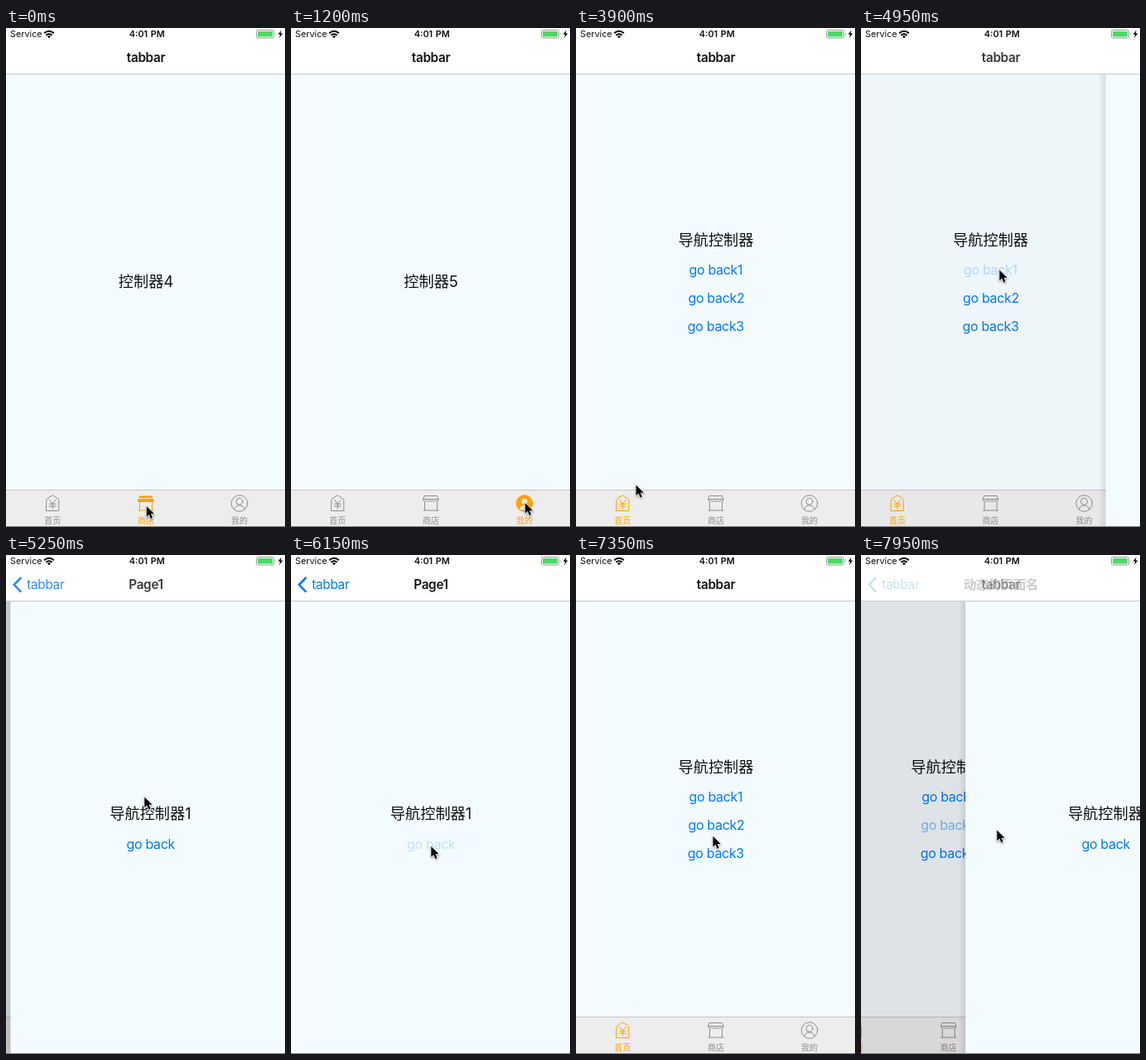
An HTML page that plays this animation: 337x601 px, repeating every 8 s.

```html
<!DOCTYPE html>
<html lang="zh-CN">
<head>
<meta charset="utf-8">
<title>tabbar</title>
<style>
  html, body { margin: 0; width: 100%; height: 100%; overflow: hidden; background: #fff; }
  svg { display: block; width: 100%; height: 100%; }
  text { font-family: Inter, "Noto Sans CJK SC", "Noto Sans CJK", sans-serif; fill: #111; }
  .mid { text-anchor: middle; }
  .status { font-size: 10.8px; }
  .title { font-size: 15.3px; font-weight: 600; letter-spacing: -.02em; }
  .heading { font-size: 18.2px; }
  .button { font-size: 16px; letter-spacing: -.02em; fill: #007aff; }
  .back { font-size: 15.3px; letter-spacing: -.02em; fill: #007aff; }
  .tab { color: #8e8e8e; fill: none; stroke: currentColor; stroke-linejoin: round; stroke-linecap: round; }
  .tab text { font-size: 10px; fill: currentColor; stroke: none; }
  .tab .solid, .tab.on .line { display: none; }
  .tab.on { color: #ffa200; }
  .tab.on .solid { display: inline; }
  #cursor { filter: drop-shadow(0 1px .8px rgba(0, 0, 0, .4)); }
</style>
</head>
<body>
<svg viewBox="0 0 337 601" preserveAspectRatio="none">
  <defs>
    <linearGradient id="edge">
      <stop offset="0" stop-opacity="0"/>
      <stop offset="1" stop-opacity=".1"/>
    </linearGradient>
  </defs>
  <rect width="337" height="601" fill="#f3fbff"/>

  <g id="root">
    <rect y="56" width="337" height="545" fill="#f3fbff"/>
    <text id="label" class="heading mid" x="169" y="312"></text>
    <g id="menu">
      <text class="heading mid" x="169" y="261.5">导航控制器</text>
      <text id="go1" class="button mid" x="168.8" y="297">go back1</text>
      <text id="go2" class="button mid" x="169.4" y="331">go back2</text>
      <text class="button mid" x="168.9" y="365">go back3</text>
    </g>
    <rect y="556" width="337" height="45" fill="#ededed"/>
    <rect y="556" width="337" height="1" fill="#c3c5c6"/>
    <g class="tab" transform="translate(56.3 572)">
      <path d="M-7.5 -3.5Q-7.5 -4.3 -6.8 -4.8L-1 -8.7Q0 -9.3 1 -8.7L6.8 -4.8Q7.5 -4.3 7.5 -3.5V9.5H-7.5Z"/>
      <path d="M-3.5 -3.5L0 1L3.5 -3.5M-4 1.2H4M-4 4H4M0 1V7"/>
      <text class="mid" y="25">首页</text>
    </g>
    <g class="tab" transform="translate(169 572)">
      <g class="line">
        <path d="M-7.5 -8.5H7.5L9 -4.5H-9ZM-9 -4.5V-3Q-7.2 0 -5.4 -3Q-3.6 0 -1.8 -3Q0 0 1.8 -3Q3.6 0 5.4 -3Q7.2 0 9 -3V-4.5M-7.5 -1V9M7.5 -1V9M-9 9H9"/>
      </g>
      <g class="solid">
        <path d="M-7.5 -8H7.5V-6.5H-7.5ZM-9 -4.5H9V-1.5H-9Z" fill="currentColor"/>
        <path d="M-7.5 -1V9M7.5 -1V9M-9 9H9"/>
      </g>
      <text class="mid" y="25">商店</text>
    </g>
    <g class="tab" transform="translate(282 572)">
      <g class="line">
        <circle cy=".5" r="9.8"/>
        <circle cy="-1.7" r="4"/>
        <path d="M-6.3 7.6C-5 1.2 5 1.2 6.3 7.6"/>
      </g>
      <g class="solid">
        <circle cy=".5" r="9.8" fill="currentColor"/>
        <g fill="#ededed" stroke="none">
          <circle cy="-1.7" r="3.5"/>
          <path d="M-6 7.2C-5 1.4 5 1.4 6 7.2Q0 10.5 -6 7.2Z"/>
        </g>
      </g>
      <text class="mid" y="25">我的</text>
    </g>
    <rect id="dim" y="56" width="337" height="545" fill="#180008"/>
  </g>

  <g id="page">
    <rect x="-9" y="56" width="9" height="545" fill="url(#edge)"/>
    <rect y="56" width="337" height="545" fill="#f3fbff"/>
    <text id="pageText" class="heading mid" x="169" y="318"></text>
    <text id="goBack" class="button mid" x="169.3" y="354">go back</text>
  </g>

  <rect width="337" height="55" fill="#fff"/>
  <rect y="55" width="337" height="1" fill="#c5cacc"/>
  <text class="status" x="5" y="11">Service</text>
  <g fill="none" stroke="#000" stroke-width="1.9">
    <path d="M46.2 6.3Q52 1.2 57.8 6.3M48.4 8.7Q52 5.6 55.6 8.7"/>
    <path d="M50 10.2Q52 8.5 54 10.2L52 12.2Z" fill="#000" stroke="none"/>
  </g>
  <text class="status mid" x="170.3" y="11" font-weight="600" word-spacing="1">4:01 PM</text>
  <rect x="302.5" y="2.5" width="21" height="9.5" rx="2" fill="none" stroke="#999"/>
  <rect x="304" y="4" width="18" height="6.5" rx=".8" fill="#4cd964"/>
  <path d="M325 5.5Q326.8 7.2 325 9Z" fill="#999"/>
  <path d="M332.6 2.5L328.7 7.8H331.2L330 12L334.3 6.4H331.7Z"/>
  <text id="rootTitle" class="title mid" x="169" y="41">tabbar</text>
  <g id="pageBar">
    <path d="M18.3 27L9.8 35.8L18.3 44.6" fill="none" stroke="#007aff" stroke-width="2.6"/>
    <text class="back" x="25.3" y="41.3">tabbar</text>
    <text id="pageTitle" class="title mid" x="169" y="41"></text>
  </g>

  <rect y="600" width="337" height="1" fill="#7c7c7c"/>
  <g id="cursor">
    <path d="M0 0V14.5L3.4 11.4L5.9 17L8.3 16L5.9 10.5H10.6Z" transform="translate(.8 1) scale(.88)" stroke="#fff" stroke-width="1.5" paint-order="stroke"/>
  </g>
</svg>
<script>
const LOOP = 8000, STEP = 150, WIDTH = 337;
const $ = id => document.getElementById(id);
const tabs = document.querySelectorAll('.tab');
const clamp = v => Math.min(1, Math.max(0, v));
const smooth = u => u * u * (3 - 2 * u);

// start, end, x, y, upward bow of the path
const moves = [
  [0, 900, 282, 571, 5],
  [1500, 1650, 282, 572, 0],
  [1800, 2550, 168, 574, 7],
  [2700, 2850, 156, 569, 0],
  [2850, 3450, 56, 577, 3],
  [3750, 4500, 207, 312, 0],
  [4500, 4800, 166.5, 290.5, 0],
  [5250, 6000, 168.5, 350, 0],
  [6300, 6450, 168.5, 358.5, 0],
  [6450, 6900, 171, 377, 0],
  [6900, 7500, 163.5, 330.5, 0]
];

const slides = [
  { at: 4917, push: true, title: 'Page1', text: '导航控制器1' },
  { at: 6248, push: false, title: 'Page1', text: '导航控制器1' },
  { at: 7834, push: true, title: '动态的页面名', text: '导航控制器' }
];

// critically damped spring
function spring(sec) {
  const u = 18.26 * sec;
  return sec > .5 ? 1 : 1 - (1 + u) * Math.exp(-u);
}

function cursorAt(ms) {
  let x = 169, y = 575;
  for (const [start, end, toX, toY, bow] of moves) {
    if (ms <= start) break;
    const u = clamp((ms - start) / (end - start)), e = smooth(u);
    x += (toX - x) * e;
    y += (toY - y) * e - bow * Math.sin(Math.PI * u);
  }
  return [x, y];
}

// pressed buttons dim at once and fade back after release
function pressed(ms, down, up) {
  if (ms < down) return 1;
  return .2 + .8 * clamp((ms - up) / 330);
}

function show(id, opacity) { $(id).setAttribute('opacity', opacity); }
function move(id, x, y = 0) { $(id).setAttribute('transform', `translate(${x} ${y})`); }

function render(ms) {
  const tab = ms < 1200 ? 1 : ms < 2850 ? 2 : ms < 3600 ? 1 : 0;
  tabs.forEach((el, i) => el.classList.toggle('on', i === tab));
  $('label').textContent = tab ? '控制器' + (tab + 3) : '';
  show('menu', tab ? 0 : 1);
  show('go1', ms < 6200 ? pressed(ms, 4800, 4930) : 1);
  show('go2', pressed(ms, 7650, 7828));
  show('goBack', ms < 7000 ? pressed(ms, 6150, 6260) : 1);

  let cover = 0, rootAlpha = 1, pageAlpha = 0;
  const slide = slides.filter(s => s.at <= ms).pop();
  if (slide) {
    const sec = (ms - slide.at) / 1000, p = spring(sec);
    const leaving = clamp(1 - sec / .2);
    cover = slide.push ? p : 1 - p;
    rootAlpha = slide.push ? leaving : clamp(sec / .24);
    pageAlpha = slide.push ? clamp((sec - .04) / .35) : leaving;
    $('pageTitle').textContent = slide.title;
    $('pageText').textContent = slide.text;
  }
  move('root', -.3 * WIDTH * cover);
  move('page', WIDTH * (1 - cover));
  show('page', cover ? 1 : 0);
  show('dim', .15 * cover);
  show('rootTitle', rootAlpha);
  show('pageBar', pageAlpha);
  move('cursor', ...cursorAt(ms));
}

const began = performance.now();
function frame() {
  const ms = Math.max(0, performance.now() - began) % LOOP;
  render(Math.floor(ms / STEP) * STEP);
  requestAnimationFrame(frame);
}
frame();
</script>
</body>
</html>
```
